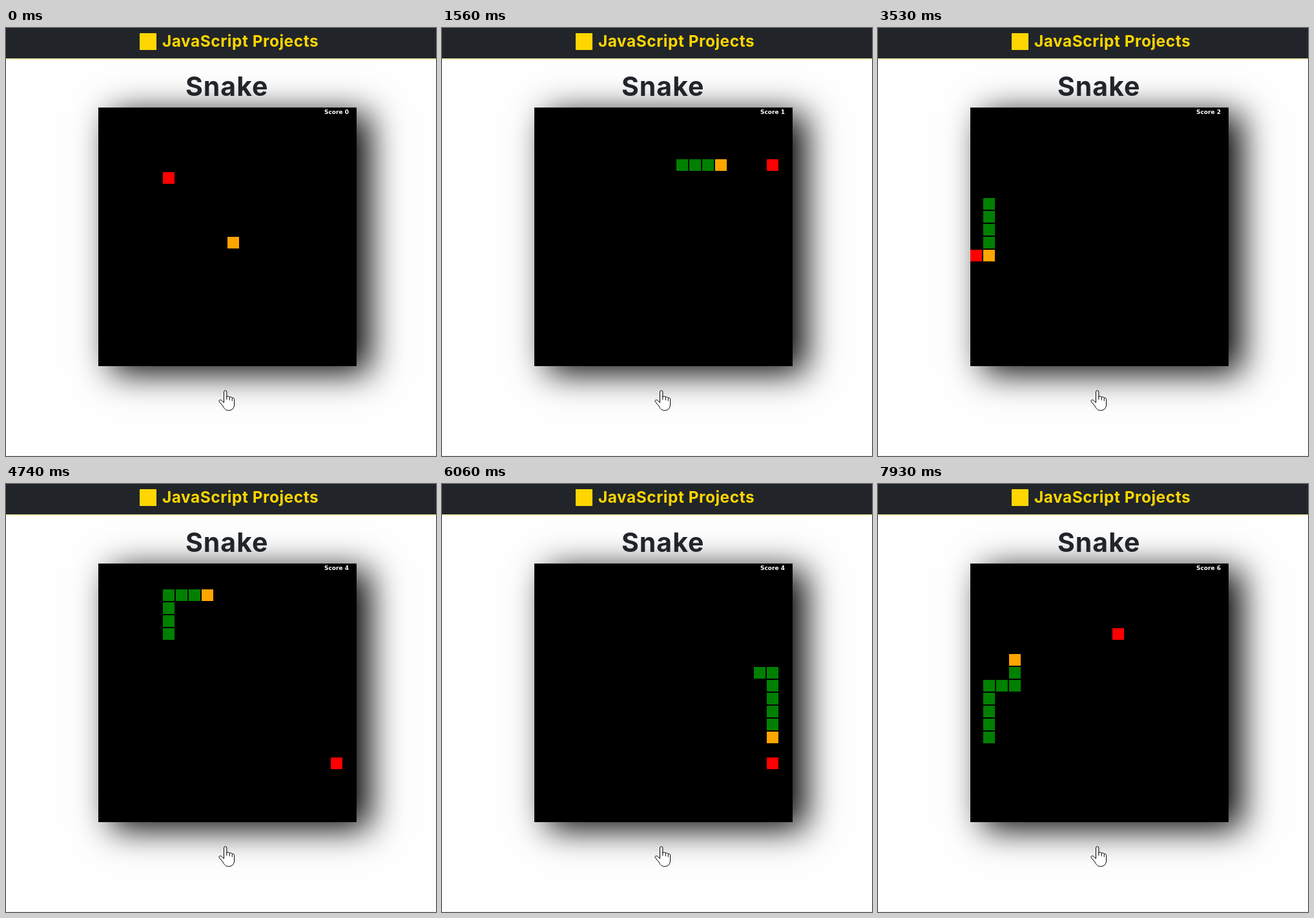
Recreate the animation shown at these times as an HTML page with a canvas. Size 666x662 px, loop 8000 ms.

```html
<!DOCTYPE html>
<html lang="en">
<head>
<meta charset="utf-8">
<title>Snake</title>
<style>
  html, body { margin: 0; width: 100%; height: 100%; overflow: hidden; background: #fefefe; }
  canvas {
    position: absolute; left: 143px; top: 123px;
    background: #000; box-shadow: 20px 10px 50px #000;
  }
  svg { position: absolute; left: 0; top: 0; font-family: Inter, sans-serif; }
</style>
</head>
<body>
<canvas id="board" width="400" height="400"></canvas>
<svg width="666" height="662">
  <rect width="666" height="47" fill="#212529"/>
  <rect y="47" width="666" height="2" fill="#fdeeb0"/>
  <rect x="207" y="8" width="26" height="26" fill="#ffd600"/>
  <text x="242" y="29" font-size="24.5" font-weight="700" letter-spacing=".5" fill="#ffd600">JavaScript Projects</text>
  <text x="278" y="105" font-size="41" font-weight="700" letter-spacing="1" fill="#212529">Snake</text>
  <rect y="661" width="666" height="1" fill="#eee"/>
  <g stroke="#000" stroke-linejoin="round" stroke-linecap="round">
    <path fill="#fff" d="M337.5 579V563a2.2 2.2 0 0 1 4.4 0V570.5c0-1 4-1.5 4.4.7c1-1 3.6-.6 4 1.2c1-.8 3.2-.4 3.3 1.8V582c0 6-3.5 9.5-8.5 9.5c-5 0-7-2.5-9-6.5L330 577.5c-.5-2 2-3.2 3.7-1.6z"/>
    <path fill="none" d="M341.9 570v4.5M346.3 571v4.5M350.3 572.5v4"/>
  </g>
</svg>
<script>
const LOOP = 8000, CELL = 20, START_LENGTH = 3;
const ROUTE = 'L5 U6 R13 D2 L17 D5 L1 U5 R5 U4 R12 D6 R1 D8 L4 U1 L13 U6 R2 U2';
const APPLES = [[5, 5], [18, 4], [0, 11], [5, 3], [18, 15], [1, 12], [11, 5]];
const DIRS = { L: [-1, 0], R: [1, 0], U: [0, -1], D: [0, 1] };

const trail = [[10, 10]];
for (const leg of ROUTE.split(' ')) {
  const [dx, dy] = DIRS[leg[0]];
  for (let i = 0; i < +leg.slice(1); i++) {
    const [x, y] = trail[trail.length - 1];
    trail.push([x + dx, y + dy]);
  }
}

let eaten = 0;
const scores = trail.map(([x, y]) => {
  const [ax, ay] = APPLES[eaten];
  if (x === ax && y === ay) eaten++;
  return eaten;
});

// Steps start about 78 ms apart and steadily get shorter
const stepTime = n => 77.9 * n - 0.094 * n * n - 7;

const ctx = document.getElementById('board').getContext('2d');

function square([x, y], color) {
  ctx.fillStyle = color;
  ctx.fillRect(x * CELL, y * CELL, CELL - 2, CELL - 2);
}

function draw(time) {
  const step = trail.findLastIndex((_, n) => stepTime(n) <= time);
  const score = scores[step];
  const length = START_LENGTH + scores[Math.max(0, step - 1)];
  ctx.fillStyle = '#000';
  ctx.fillRect(0, 0, 400, 400);
  for (let i = Math.max(0, step - length + 1); i < step; i++) square(trail[i], 'green');
  square(trail[step], 'orange');
  square(APPLES[score], 'red');
  ctx.fillStyle = '#fff';
  ctx.font = 'bold 9px "DejaVu Sans", sans-serif';
  ctx.fillText('Score ' + score, 350, 10);
}

let start;
function tick(now) {
  start ??= now;
  draw(Math.max(0, now - start) % LOOP);
  requestAnimationFrame(tick);
}
draw(0);
requestAnimationFrame(tick);
</script>
</body>
</html>
```
